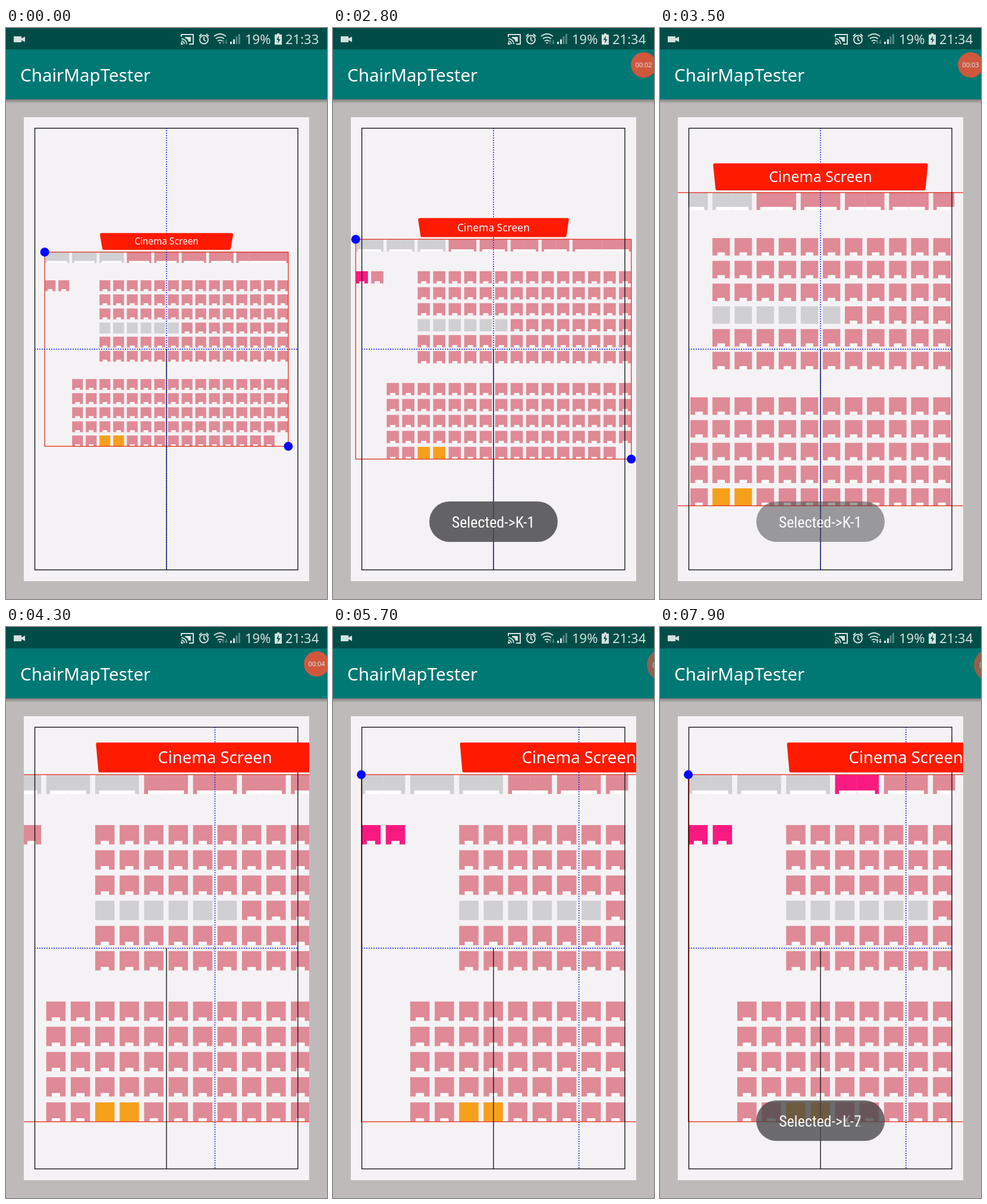
Write an HTML page that moves like this. It is 540 px wide and 960 px high and loops after 8 s.

```html
<!DOCTYPE html>
<html lang="en">
<head>
<meta charset="utf-8">
<title>Seat plan</title>
<style>
  html, body { margin: 0; width: 100%; height: 100%; overflow: hidden; background: #bebab9; }
  svg { display: block; width: 540px; height: 960px; }
  text { font-family: "Noto Sans", "Open Sans", sans-serif; fill: #fff; }
  .status text { font-size: 22px; fill: #d3e1e0; }
  .mid { text-anchor: middle; }
  .toast text { font: 26px "Roboto Condensed", Roboto, sans-serif; font-stretch: 75%; }
  .dots { stroke: #1420d8; stroke-width: 1.4; stroke-dasharray: 2 2; }
</style>
</head>
<body>
<svg viewBox="0 0 540 960">
  <defs>
    <clipPath id="panelClip"><rect x="30" y="150" width="480" height="780"/></clipPath>
    <linearGradient id="shade" x2="0" y2="1">
      <stop offset="0" stop-color="#000" stop-opacity=".32"/>
      <stop offset="1" stop-color="#000" stop-opacity="0"/>
    </linearGradient>
  </defs>

  <rect width="540" height="960" fill="#bebab9"/>
  <rect y="120" width="540" height="7" fill="url(#shade)"/>
  <rect y="36" width="540" height="84" fill="#007874"/>
  <rect width="540" height="36" fill="#004d48"/>
  <text x="24" y="90" font-size="29.5">ChairMapTester</text>

  <g class="status" fill="#d3e1e0">
    <path d="M13 14h13v3.500l6-3v9l-6-3v3.500h-13z"/>
    <g fill="none" stroke="#d3e1e0" stroke-width="2">
      <path d="M295 15v-4h20v16h-7M295 18a9 9 0 0 1 9 9M295 22a5 5 0 0 1 5 5"/>
      <circle cx="333" cy="19.500" r="7"/>
      <path d="M333 15v5l3 2M325 14l4-4M341 14l-4-4"/>
      <path d="M350 14q10-8 20 0M353 18q7-5 14 0M356 22q4-3 8 0"/>
    </g>
    <path d="M294 24v4h4a4 4 0 0 0-4-4zM301 15h10v8h-4q-1-5-6-6zM358 24h4l-2 3z"/>
    <path id="arrows" d="M363 23l2.500-3 2.500 3h-1.700v4h-1.600v-4zM368 24h1.700v-4h1.600v4h1.700l-2.500 3z"/>
    <path d="M377 27h3v-4h-3zM382 27h3v-8h-3z"/>
    <path d="M386.500 27h3v-13h-3zM391 27h3v-17h-3z" opacity=".4"/>
    <text x="402" y="27">19%</text>
    <path d="M456 9h4v2h4v17h-12v-17h4z"/>
    <path d="M459 13l-4 7h3l-1 6 4.500-7h-3z" fill="#004d48"/>
    <text id="clock" x="470" y="27"></text>
  </g>

  <rect x="30" y="150" width="480" height="780" fill="#f4f2f5"/>
  <g clip-path="url(#panelClip)">
    <g id="hall"></g>
    <rect id="bounds" fill="none" stroke="#e5301f" stroke-width="1.3"/>
    <g fill="none" stroke="#08080c" stroke-width="1.300">
      <rect x="48.500" y="168.500" width="442.500" height="742.500"/>
      <path d="M270 540V911"/>
    </g>
    <path class="dots" d="M48 540H491"/>
    <path id="axis" class="dots"/>
    <path id="screen" fill="#ff1a00" stroke="#ff1a00" stroke-width="5" stroke-linejoin="round"/>
    <text id="screenText" class="mid">Cinema Screen</text>
    <circle id="startDot" r="7.5" fill="#0008fa"/>
    <circle id="endDot" r="7.5" fill="#0008fa"/>
  </g>

  <g id="toasts"></g>
  <g id="bubble">
    <circle r="27" fill="#ff5030"/>
    <text id="timer" class="mid" y="5" font-size="14"></text>
  </g>
</svg>

<script>
const LOOP = 8000, STEP = 100;
const PITCH_X = 23.03, PITCH_Y = 23.72, SEAT = 18.2;
const HALL_W = 17 * PITCH_X + SEAT, HALL_H = 13 * PITCH_Y + SEAT;
const FRAME_LEFT = 48, FRAME_RIGHT = 491;
const COLOR = { free: '#df8a96', picked: '#f81a80', sold: '#d0cfd2', mine: '#f5a01c' };

// Each track is a list of [time, value] points.
const ZOOM = [[2300, 1], [2500, 1.03], [2800, 1.1316], [3200, 1.38], [3500, 1.6125], [3800, 1.787]];
const CENTER = [[4100, 270], [4200, 306], [4300, 351.5], [4500, 405], [4800, 430], [5000, 434], [5400, 413.7]];
const BUBBLE_X = [[2300, 510], [2700, 522.5], [5000, 522.5], [5400, 555]];
const BUBBLE_Y = [[2300, 64], [2700, 62], [5000, 62], [5400, 64]];
const BUBBLE_SIZE = [[300, 0], [600, 1], [2300, 1], [2700, .79], [5000, .79], [5400, 1]];
const BUBBLE_ALPHA = [[2300, 1], [2700, .82], [5000, .82], [5400, .58]];

const $ = id => document.getElementById(id);
const set = (el, attrs) => { for (const k in attrs) el.setAttribute(k, attrs[k]); return el; };
const add = (parent, tag, attrs) =>
  parent.appendChild(set(document.createElementNS('http://www.w3.org/2000/svg', tag), attrs));
const clamp = v => Math.min(1, Math.max(0, v));

function track(points, t) {
  if (t <= points[0][0]) return points[0][1];
  for (let i = 1; i < points.length; i++) {
    const [t0, a] = points[i - 1], [t1, b] = points[i];
    if (t <= t1) return a + (b - a) * (t - t0) / (t1 - t0);
  }
  return points[points.length - 1][1];
}

const cells = [];

function addCell(x, row, w, kind, notch, pickTime = Infinity, bleed = 0) {
  const y = row * PITCH_Y, g = add($('hall'), 'g', {});
  const body = add(g, 'rect', { x, y, width: w + bleed, height: SEAT, fill: COLOR[kind] });
  if (notch) add(g, 'rect', { x: x + notch[0], y: y + SEAT - 3.3, width: notch[1], height: 3.4, fill: '#fff' });
  cells.push({ g, body, x, w, kind, pickTime });
}

function addSeat(row, col, kind, pickTime) {
  addCell(col * PITCH_X, row, SEAT, kind, kind === 'free' && [5.2, 7.8], pickTime);
}

// A sofa is split in equal parts that are hidden one by one.
function addSofa(col, span, kind, pickTime) {
  const part = ((span - 1) * PITCH_X + SEAT) / span, inset = 3.7;
  for (let i = 0; i < span; i++) {
    const left = i ? 0 : inset, last = i === span - 1;
    addCell(col * PITCH_X + i * part, 0, part, kind,
      [left, part - left - (last ? inset : 0) + (last ? 0 : .2)], pickTime, last ? 0 : .2);
  }
}

for (let col = 0; col < 14; col += 2) addSofa(col, 2, col < 6 ? 'sold' : 'free', col === 6 ? 6900 : undefined);
addSofa(14, 4, 'free');
addSeat(2, 0, 'free', 1200);
addSeat(2, 1, 'free', 5700);
for (let row = 2; row < 14; row++) {
  if (row === 8) continue;
  const lastCol = row === 13 ? 16 : 17;
  for (let col = row < 8 ? 4 : 2; col <= lastCol; col++) {
    const kind = row === 5 && col < 10 ? 'sold' : row === 13 && (col === 4 || col === 5) ? 'mine' : 'free';
    addSeat(row, col, kind);
  }
}

const toasts = [['K-1', 1250, 3350], ['K-2', 5750, 7740], ['L-7', 7700, 9900]].map(([seat, from, to]) => {
  const g = add($('toasts'), 'g', { class: 'toast' });
  add(g, 'rect', { x: 162, y: 796, width: 216, height: 68, rx: 34, fill: '#4b494c', 'fill-opacity': .85 });
  add(g, 'text', { x: 269.5, y: 840, class: 'mid' }).textContent = 'Selected->' + seat;
  return { g, from, to };
});

function drawHall(t) {
  const s = track(ZOOM, t), cx = track(CENTER, t);
  const w = HALL_W * s, h = HALL_H * s, left = cx - w / 2, top = 540 - h / 2;

  set($('hall'), { transform: `translate(${left} ${top}) scale(${s})` });
  for (const c of cells) {
    const x = left + c.x * s;
    const visible = x + c.w * s > FRAME_LEFT + .5 && x < FRAME_RIGHT;
    c.g.style.display = visible ? '' : 'none';
    set(c.body, { fill: COLOR[t >= c.pickTime ? 'picked' : c.kind] });
  }
  set($('bounds'), { x: left, y: top, width: w, height: h });
  set($('startDot'), { cx: left, cy: top });
  set($('endDot'), { cx: left + w, cy: top + h });
  set($('axis'), { d: `M${cx} 168V911` });

  const half = 112 * s, tall = 28.2 * s, base = top - 3.7;
  set($('screen'), {
    d: `M${cx - half + 2.5} ${base - tall + 2.5}H${cx + half - 2.5}L${cx + half - 6.5} ${base - 2.5}H${cx - half + 6.5}Z`
  });
  set($('screenText'), { x: cx, y: base - tall / 2 + 5.5 * s, 'font-size': 15.4 * s });
}

function drawOverlay(t) {
  for (const { g, from, to } of toasts) {
    const rise = 1 - (1 - clamp((t - from) / 450)) ** 2;
    set(g, { opacity: rise * (1 - clamp((t - to) / 400)) });
  }
  const x = track(BUBBLE_X, t), y = track(BUBBLE_Y, t);
  set($('bubble'), {
    transform: `translate(${x} ${y}) scale(${track(BUBBLE_SIZE, t)})`,
    opacity: track(BUBBLE_ALPHA, t)
  });
  $('timer').textContent = '00:0' + Math.max(0, Math.floor((t - 200) / 1000));
  $('clock').textContent = t < 2200 ? '21:33' : '21:34';
  set($('arrows'), { opacity: t < 6000 ? .4 : 1 });
}

function draw(ms) {
  const t = Math.floor((ms % LOOP) / STEP) * STEP;
  drawHall(t);
  drawOverlay(t);
}

const start = performance.now();
function tick() {
  draw(performance.now() - start);
  requestAnimationFrame(tick);
}
tick();
</script>
</body>
</html>
```
